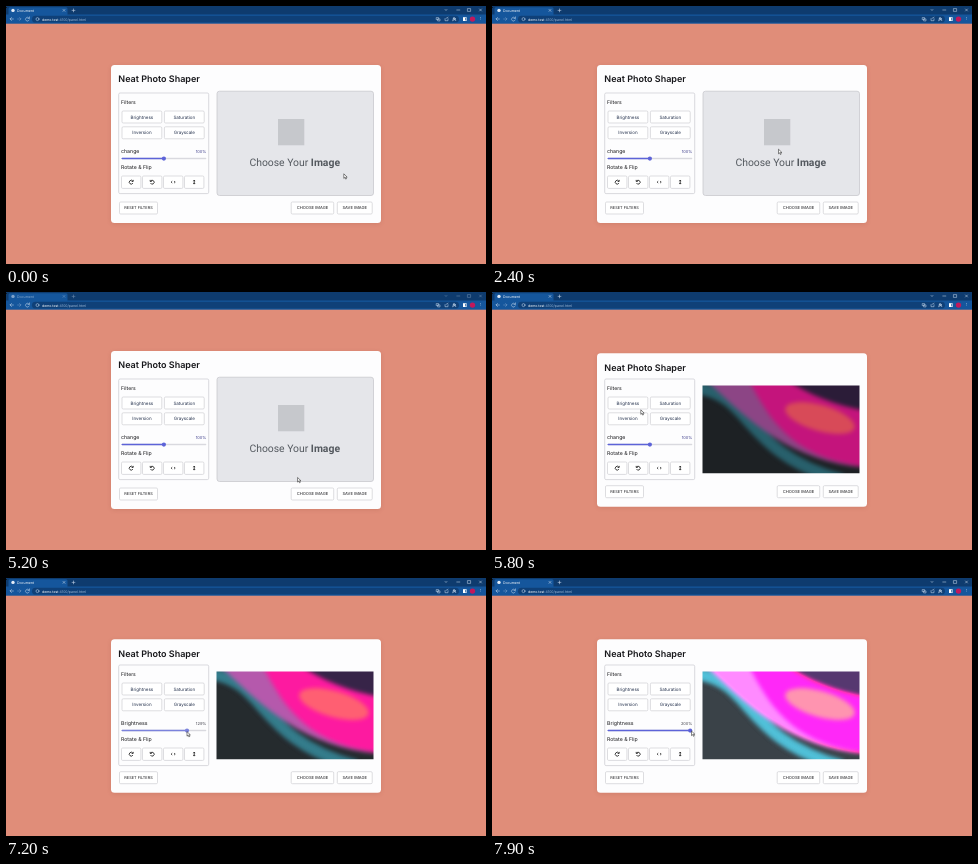
An HTML page that plays this animation: 480x258 px, repeating every 8000 ms.

```html
<!DOCTYPE html>
<html lang="en">
<head>
<meta charset="utf-8">
<title>Document</title>
<style>
  html, body { margin: 0; width: 100%; height: 100%; overflow: hidden; background: #e08d79; }
  svg { display: block; width: 480px; height: 258px; }
  text { font-family: Inter, "Open Sans", sans-serif; fill: #17171b; text-rendering: geometricPrecision; }
  .mid { text-anchor: middle; }
  .btn rect { fill: #fff; stroke: #cfcfd3; stroke-width: .7; }
  .hover rect { fill: #a970f2; stroke: #8f55dc; }
  #filters text { fill: #23304c; }
  .ico { fill: none; stroke: #111; stroke-width: .8; }
  .bar { fill: none; stroke: #c3d5ea; stroke-width: .55; stroke-linecap: round; }
  #panel { filter: drop-shadow(0 1px 2px rgba(90, 30, 15, .12)); }
  #soft { filter: blur(2px); }
</style>
</head>
<body>
<svg viewBox="0 0 480 258">
  <defs>
    <clipPath id="crop"><rect x="210.5" y="93.5" width="157" height="87.7"/></clipPath>
    <path id="turn" d="M1.6 -1A1.9 1.9 0 1 0 1.7 .8M2 -2.3V-.8H.4"/>
    <path id="arrow" d="M-.9 -1L0 -2 .9 -1"/>
    <path id="cross" d="M-1 -1L1 1M1 -1L-1 1"/>
  </defs>
  <rect width="480" height="258" fill="#e08d79"/>

  <g id="browser">
    <rect width="480" height="9" fill="#0e3b6e"/>
    <rect y="8.5" width="480" height="9.2" fill="#15569c"/>
    <rect x="2.5" y="1.3" width="59" height="9" rx="1.5" fill="#15569c"/>
    <rect x="26" y="9.8" width="427" height="6.8" rx="3.4" fill="#0f4078"/>
    <g id="tabs">
      <circle cx="7" cy="4.4" r="1.7" fill="#e6eef8"/>
      <text x="11" y="5.7" font-size="3.5" style="fill:#fff">Document</text>
      <use href="#cross" class="bar" x="58" y="4.4"/>
      <use href="#cross" class="bar" transform="translate(67.5 4.4) rotate(45)"/>
      <use href="#arrow" class="bar" transform="translate(440 2.5) scale(1 -1)"/>
      <path class="bar" d="M450.8 4h3M461.8 2.6h2.8v2.8h-2.8z"/>
      <use href="#cross" class="bar" x="474.5" y="4"/>
    </g>
    <path class="bar" d="M7.4 13H4l1.5-1.5M4 13l1.5 1.5"/>
    <path class="bar" d="M11.6 13H15l-1.5-1.5M15 13l-1.5 1.5" opacity=".5"/>
    <use href="#turn" class="bar" x="21.5" y="13.2"/>
    <circle class="bar" cx="31.5" cy="13.1" r="1.5"/>
    <text x="36" y="14.5" font-size="3.5" style="fill:#fff">demo.test<tspan fill="#9fb9d6">:4100/panel.html</tspan></text>
    <path class="bar" d="M430.6 11.6h2v2h-2zM432 12.9h2v2h-2zM439 12.7v2h3v-2M440 12.4l2-1.2"/>
    <path class="bar" d="M448.2 11.4l1.7 3.2-3-2h3l-3 2z"/>
    <rect x="457" y="11.2" width="3.6" height="3.8" fill="#fff"/>
    <rect x="459.3" y="11.8" width=".8" height="2.6" fill="#15569c"/>
    <circle cx="466.5" cy="13.1" r="2.7" fill="#c2185b"/>
    <path class="bar" d="M474.5 11.5v3.2" stroke-dasharray="0 1.6"/>
  </g>

  <rect id="panel" x="105" width="270" rx="3.5" fill="#fdfdfe"/>
  <text id="title" x="112.3" font-size="9" font-weight="600">Neat Photo Shaper</text>

  <rect x="112.7" y="87" width="90" height="100.6" rx="1.4" fill="none" stroke="#cbcbd0" stroke-width=".7"/>
  <text x="115" y="98" font-size="5.1">Filters</text>
  <g id="filters"></g>
  <text id="label" x="115" y="147" font-size="5.25"></text>
  <text id="value" x="200.3" y="146.5" font-size="4" text-anchor="end"></text>
  <rect x="115.5" y="151.8" width="84.8" height="1.5" rx=".75" fill="#d9d9df"/>
  <rect id="fill" x="115.5" y="151.8" height="1.5" rx=".75"/>
  <circle id="thumb" cy="152.6" r="2.1"/>
  <text x="115" y="163" font-size="5.2">Rotate &amp; Flip</text>
  <g id="turns"></g>
  <use href="#turn" class="ico" x="125.2" y="176.2"/>
  <use href="#turn" class="ico" transform="translate(146.2 176.2) scale(-1 1)"/>
  <g id="flip" class="ico">
    <use href="#arrow"/><use href="#arrow" transform="rotate(180)"/>
  </g>
  <use href="#flip" transform="translate(167.2 176.1) rotate(90)"/>
  <use href="#flip" transform="translate(188.2 176.1)"/>
  <path class="ico" d="M188.2 174.4v3.4"/>
  <g id="footer"></g>

  <g id="empty">
    <rect x="211" y="85.2" width="156.5" height="104.3" rx="2.5" fill="#e5e6ea" stroke="#c9cacf" stroke-width=".8"/>
    <rect x="272" y="113" width="26.3" height="26.3" fill="#c6c8cc"/>
    <text x="288.7" y="159.6" class="mid" font-size="10.4" style="font-family:Roboto,sans-serif;fill:#54595f">Choose Your <tspan font-weight="700">Image</tspan></text>
  </g>

  <g id="photo" clip-path="url(#crop)">
    <g id="tone">
      <rect x="205" y="88" width="168" height="99" fill="#1d2124"/>
      <g id="soft">
        <path d="M205 96C262 104 250 160 350 188" fill="none" stroke="#28606c" stroke-width="12"/>
        <path d="M212 86H300L380 112V176C300 172 258 130 212 86Z" fill="#8c4585"/>
        <path d="M256 86H300L380 112V176C310 168 282 140 256 86Z" fill="#c4147c"/>
        <path d="M292 86H380V120C345 114 318 104 292 86Z" fill="#2b1c38"/>
        <ellipse cx="328" cy="126" rx="36" ry="13" transform="rotate(16 328 126)" fill="#d84a58"/>
      </g>
    </g>
  </g>

  <path id="cursor" d="M0 0V4.6L1.1 3.6 1.9 5.3 2.7 4.9 1.9 3.3H3.4Z" fill="#fff" stroke="#222" stroke-width=".55"/>
</svg>
<script>
const LOOP = 8000, STEP = 100;
const $ = id => document.getElementById(id);
const set = (id, attrs) => { for (const k in attrs) $(id).setAttribute(k, attrs[k]); };
const clamp = (v, lo, hi) => Math.min(hi, Math.max(lo, v));

const button = (x, y, w, text = "", size = 4.1, h = 12) =>
  `<g class="btn"><rect x="${x}" y="${y}" width="${w}" height="${h}" rx="1.2"/>` +
  `<text class="mid" x="${x + w / 2}" y="${y + h / 2 + size * .36}" font-size="${size}">${text}</text></g>`;

$("filters").innerHTML = ["Brightness", "Saturation", "Inversion", "Grayscale"]
  .map((name, i) => button(116 + i % 2 * 42.4, 105 + (i >> 1) * 15.8, 39.8, name, 4.5)).join("");
$("turns").innerHTML = [0, 1, 2, 3].map(i => button(115.5 + i * 21, 170, 19.4, "", 4, 12.4)).join("");
$("footer").innerHTML = button(113.5, 196, 38, "RESET FILTERS", 3.9) +
  button(285.2, 196, 42.5, "CHOOSE IMAGE") + button(331.3, 196, 34.9, "SAVE IMAGE");
const choose = $("footer").children[1];

// moments of the story, in ms
const HOVER = 3300, DIALOG = 3500, LEAVE = 4800, LOAD = 5300, PICK = 6100, GRAB = 6350, DROP = 7800;

// places the pointer passes: time, x, y
const stops = [
  [0, 337.8, 167.8], [800, 291.5, 120], [1200, 293, 133], [2400, 286.5, 143.2],
  [HOVER, 306, 200], [3900, 188.5, 125.8], [5000, 318, 198], [5800, 148.8, 117.8],
  [PICK, 138, 112], [GRAB, 158, 153], [6600, 169.7, 153.2], [7200, 181, 153.6], [LOOP - STEP, 199.5, 153]
];

function pointer(t) {
  const i = clamp(stops.findIndex(s => s[0] > t), 1, stops.length - 1);
  if (t >= LOOP - STEP) return stops[stops.length - 1].slice(1);
  const [t0, x0, y0] = stops[i - 1], [t1, x1, y1] = stops[i];
  const p = (t - t0) / (t1 - t0), e = p * p * (3 - 2 * p);
  return [x0 + (x1 - x0) * e, y0 + (y1 - y0) * e];
}

function draw(t) {
  const [x, y] = pointer(t);
  const loaded = t >= LOAD, away = t >= DIALOG && t < LOAD, pressed = t >= GRAB && t < DROP;
  const shrink = loaded ? 2.3 : 0;
  const knob = t < GRAB ? 157.9 : clamp(x, 157.9, 198.2);
  // the filter trails the knob, slow at first
  const level = Math.round(100 + 100 * clamp((t - 6600) / 1300, 0, 1) ** 1.6);
  const accent = pressed ? "#7b82dc" : "#5d63d8";

  set("cursor", { transform: `translate(${x} ${y})` });
  set("tabs", { opacity: away ? .5 : 1 });
  set("panel", { y: 59 + shrink, height: 158 - 2 * shrink });
  set("title", { y: 76.2 + shrink });
  set("footer", { transform: `translate(0 ${-shrink})` });
  set("empty", { visibility: loaded ? "hidden" : "visible" });
  set("photo", { visibility: loaded ? "visible" : "hidden" });
  set("fill", { width: knob - 115.5, fill: accent });
  set("thumb", { cx: knob, fill: accent });
  $("tone").style.filter = `brightness(${level}%)`;
  choose.classList.toggle("hover", t >= HOVER && t < LEAVE);
  $("label").textContent = t < PICK ? "change" : "Brightness";
  $("value").textContent = level + "%";
  $("value").style.fill = t < GRAB ? "#3f3f8c" : "#44444f";
}

const start = performance.now();
(function tick() {
  const t = (performance.now() - start) % LOOP;
  draw(Math.floor(t / STEP) * STEP);
  requestAnimationFrame(tick);
})();
</script>
</body>
</html>
```
